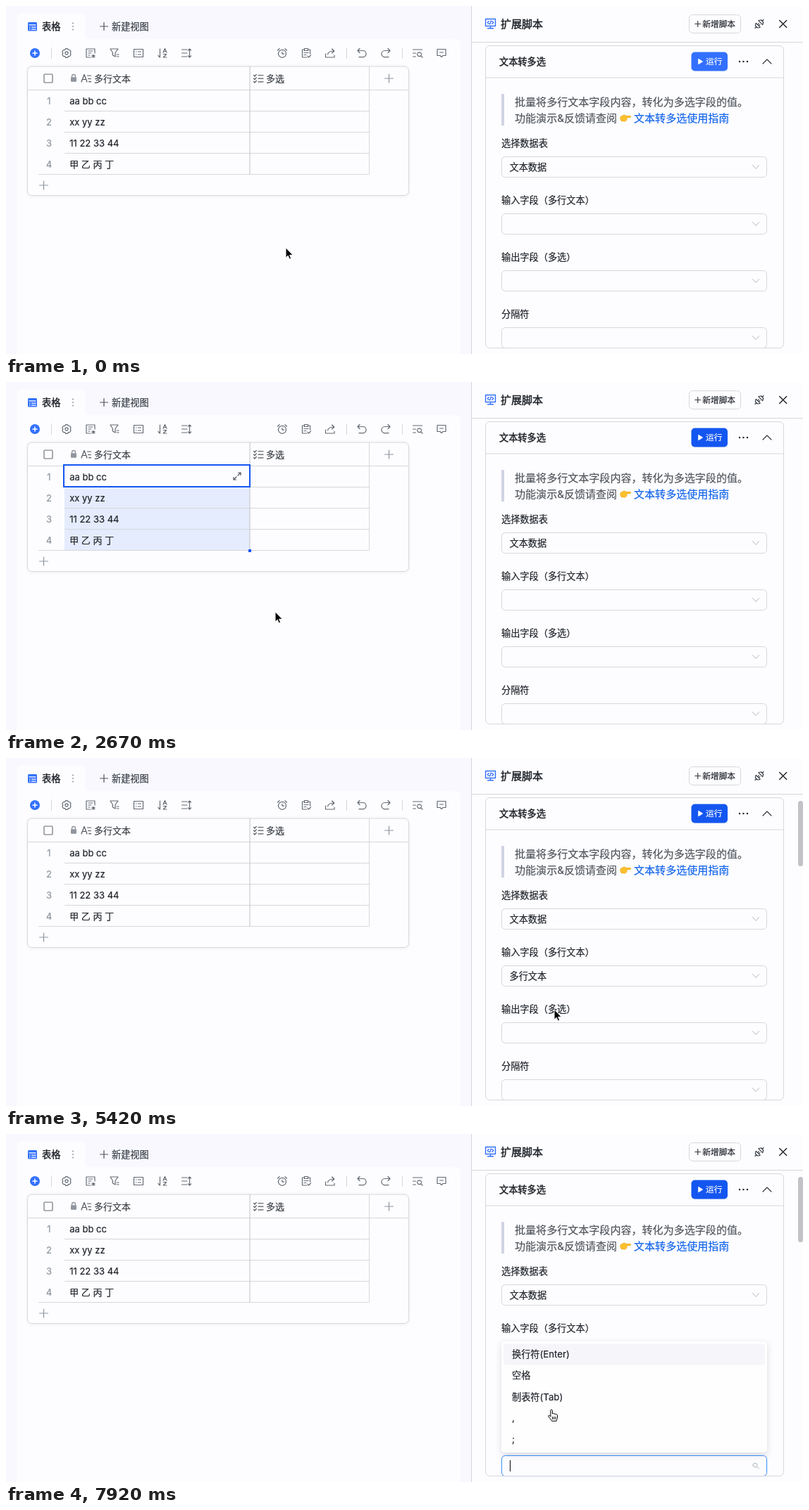
An HTML page that plays this animation: 1131 by 495 pixels, repeating every 8000 ms.

```html
<!DOCTYPE html>
<html lang="zh-CN">
<head>
<meta charset="utf-8">
<title>文本转多选</title>
<style>
html, body { margin: 0; width: 100%; height: 100%; overflow: hidden; background: #f8f8fe; }
svg { display: block; width: 1131px; height: 495px; }
text { font-family: Inter, "Noto Sans CJK SC", "Noto Sans CJK", sans-serif; white-space: pre; stroke-width: .2px; }
text[font-weight="500"] { stroke-width: .45px; }
.drop { filter: drop-shadow(0 3px 5px rgba(30, 35, 60, .16)); }
</style>
</head>
<body>
<svg id="stage" viewBox="0 0 1131 495" xmlns="http://www.w3.org/2000/svg"></svg>
<script>
const LOOP = 8000, TICK = 1000 / 12;
const INK = '#1f2329', GREY = '#646a73', LINE = '#d5d7dc', BLUE = '#3370ff', DEEP = '#1456f0', PAPER = '#fdfdff';
const FIELD_Y = [214.5, 295.5, 376.5, 457.5];

// Drawing helpers; text and icons are placed by their vertical centre.
const text = (x, cy, s, size = 13.2, fill = INK, extra = '') =>
  `<text x="${x}" y="${cy + size * .35}" font-size="${size}" fill="${fill}" stroke="${fill}" ${extra}>${s}</text>`;
const rect = (x, y, w, h, fill, extra = '') =>
  `<rect x="${x}" y="${y}" width="${w}" height="${h}" fill="${fill}" ${extra}/>`;
const line = (d, color = LINE, w = 1, fill = 'none') =>
  `<path d="${d}" fill="${fill}" stroke="${color}" stroke-width="${w}"/>`;
const icon = (x, y, d, color = GREY, w = 1.2, fill = 'none') =>
  `<path transform="translate(${x} ${y})" d="${d}" fill="${fill}" stroke="${color}" stroke-width="${w}" stroke-linecap="round" stroke-linejoin="round"/>`;
const plus = (x, y, r, color = GREY, w = 1.2) => icon(x, y, `M${-r} 0H${r}M0 ${-r}V${r}`, color, w);
const group = (id, body, extra = '') => `<g id="${id}" ${extra}>${body}</g>`;
const dot = (x, y, r, fill) => `<circle cx="${x}" cy="${y}" r="${r}" fill="${fill}"/>`;
const box = (x, y) => rect(x - 6, y - 6, 12, 12, PAPER, `rx="1" stroke="${GREY}" stroke-width="1.1"`);
const ring = r => `M${-r} 0a${r} ${r} 0 1 0 ${2 * r} 0a${r} ${r} 0 1 0 ${-2 * r} 0`;

function tabs() {
  return line('M15 495V19Q15 11 23 11H105Q113 11 113 19V41Q113 47 119 47H637Q645 47 645 55V495Z', 'none', 0, PAPER) +
    rect(31, 23, 13, 12.5, BLUE, 'rx="1.5"') +
    line('M32.5 26.9H42.5M36 30.2H42.5M36 33.2H42.5M33 30.2H34.5M33 33.2H34.5', PAPER, 1.2) +
    text(51, 29, '表格', 13.2, INK, 'font-weight="500"') +
    [24.5, 29, 33.5].map(y => dot(95, y, 1, '#8f959e')).join('') +
    plus(139, 29, 5.5, '#51565d') + text(150, 29, '新建视图', 13.2, '#373c43');
}

function toolbar() {
  const y = 67, page = 'M6 0V-6H-6V6H0M-3-3H3M-3 0H1M-3 3H-1';
  const tools = [
    [86, 'M-1.5-6.3H1.5L2.4-4.6L4.6-4.5L6.1-2L5.2 0L6.1 2L4.6 4.5L2.4 4.6L1.5 6.3H-1.5L-2.4 4.6L-4.6 4.5L-6.1 2L-5.2 0L-6.1-2L-4.6-4.5L-2.4-4.6Z' + ring(2.1)],
    [120, page + 'M4 2V6.5M2 3.2L6 5.4M6 3.2L2 5.4'],
    [154, 'M-6-6H5L1-.5V5L-2.5 3V-.5ZM3 2H6M3 5H6'],
    [188, 'M-6.5-5.5H6.5V5.5H-6.5ZM-3.5-2H-3M-.5-2H3.5M-3.5 2H-3M-.5 2H3.5'],
    [222, 'M-3.5-6V6L-6 3.5M1-.8L3.5-6.5L6-.8M2-2.5H5M1.3 1.5H5.7L1.3 6H5.7'],
    [256, 'M-6.5-5H1M-6.5 0H1M-6.5 5H1M4.5-6V6M2.5-4L4.5-6L6.5-4M2.5 4L4.5 6L6.5 4'],
    [392, 'M-5.5 .8a5.5 5.5 0 1 0 11 0a5.5 5.5 0 1 0-11 0M0-2V1.2H2.6M-6.5-4L-4-6.3M6.5-4L4-6.3'],
    [426, 'M-2.5-5H-5.5V6H1M2.5-5H5.5V1M-2.5-6.5H2.5V-3.5H-2.5ZM-3-.5H3M-3 2.5H0M2 4.2L3.7 6L6.5 2.8'],
    [460, 'M-6.5 1V6H6V3M-3.5 2C-3-2 0-3 5.5-3M2.5-6L5.8-3L2.5 0'],
    [505, 'M-3-6.5L-6-3.5L-3-.5M-6-3.5H1.5A4.6 4.6 0 0 1 1.5 5.7H-4'],
    [539, 'M3-6.5L6-3.5L3-.5M6-3.5H-1.5A4.6 4.6 0 0 0-1.5 5.7H4'],
    [584, 'M-6.5-5H6.5M-6.5 0H-2.5M-6.5 5H-2.5M-.3 1.7a2.9 2.9 0 1 0 5.8 0a2.9 2.9 0 1 0-5.8 0M4.6 3.8L6.8 6'],
    [618, 'M-6-5.5H6V3.5H2L0 5.7L-2 3.5H-6ZM-2.5-1H2.5']
  ];
  return dot(41, y, 7, BLUE) + plus(41, y, 3, '#fff', 1.5) +
    [64.5, 483.5, 562.5].map(x => line(`M${x} 59V75`)).join('') +
    tools.map(([x, d]) => icon(x, y, d)).join('');
}

function table() {
  const rows = ['aa bb cc', 'xx yy zz', '11 22 33 44', '甲 乙 丙 丁'];
  const cy = i => 135.2 + 30 * i;
  return rect(30.5, 86, 541, 183.5, PAPER, `rx="6" stroke="${LINE}" style="filter:drop-shadow(0 1px 2px rgba(30,35,60,.07))"`) +
    rect(83, 87, 263, 32, '#f3f4f8', 'id="headHover"') +
    rect(46, 119, 469, 30, '#f6f7fb', 'id="rowTint"') +
    rect(83, 119, 263, 30, '#e4ecfd', 'id="range"') +
    line('M31 119.5H571M83 149.5H515M83 179.5H515M83 209.5H515M46 239.5H515M515.5 86V239') +
    line('M346 86V239', '#bfc2c9') +
    box(60, 103) +
    icon(96, 103, 'M-2.5-1V-3A2.5 2.5 0 0 1 2.5-3V-1', '#8f959e', 1.3) + rect(92, 101.3, 8, 6.5, '#8f959e', 'rx="1"') +
    icon(113, 103, 'M-6 5L-2-5.5L2 5M-4.7 1.5H.7M2.5-4H7.5M3.5 .5H7.5M4.5 4.7H7.5', '#51565d') +
    text(125, 103, '多行文本', 13, '#373c43') +
    icon(358, 103, 'M-6.5-4.5L-5-3L-2.7-5.7M-6.5 0L-5 1.5L-2.7-1.2M-6.5 4.5L-5 6L-2.7 3.3M0-4.5H7M0 .2H7M0 4.8H7', '#51565d') +
    text(369, 103, '多选', 13, '#373c43') +
    plus(543.5, 103, 6, '#8f959e') + plus(53.5, 255, 6, '#8f959e') +
    group('active', rect(82, 118, 264, 31, PAPER, `stroke="${DEEP}" stroke-width="2"`) +
      icon(328, 134, 'M1.5-5H5V-1.5M5-5L1-1M-1.5 5H-5V1.5M-5 5L-1 1', '#51565d') +
      rect(344, -2, 4, 4, DEEP, 'id="handle"')) +
    rows.map((s, i) => text(90.2, cy(i), s, 13) +
      text(61, cy(i), i + 1, 13, '#8f959e', `id="num${i}" text-anchor="middle"`)).join('') +
    group('rowTools', box(60, 134.5) +
      [0, 1, 2, 3, 4, 5].map(k => dot(39 + k % 2 * 4.2, 130 + (k >> 1) * 4.5, 1.1, '#8f959e')).join(''));
}

function field(i, label, value = '') {
  const y = FIELD_Y[i], c = y + 14.5;
  return text(703, y - 18.8, label) +
    rect(703.5, y, 376, 29, PAPER, `id="field${i}" rx="5"`) +
    group('value' + i, text(714.5, c, value)) +
    group('arrow' + i, icon(1064, c, 'M-4.5-2.5L0 2.5L4.5-2.5', '#b3b7be', 1));
}

function panel() {
  return rect(660, 0, 471, 495, PAPER) + line('M660.5 0V495M661 51.5H1131') +
    icon(687.5, 25, 'M-7-6.5H7V3.5H-7ZM0 3.5V6.8M-4 6.8H4M-2.3-3.3L-4.3-1.5L-2.3 .3M2.3-3.3L4.3-1.5L2.3 .3M.7-3.8L-.7 .8', BLUE, 1.4) +
    text(702, 25.5, '扩展脚本', 15, INK, 'font-weight="500"') +
    rect(969.5, 12.5, 73, 26, PAPER, `rx="5" stroke="${LINE}"`) + plus(981.7, 25.5, 4, '#373c43') +
    text(988.3, 25.5, '新增脚本', 11.7) +
    icon(1069, 25.5, 'M-6 6L-3.7 3.7M6-6L3.7-3.7M-4.7-1.2L1.2 4.7L-.6 5.3Q-3 6-4.6 4.2T-5.3 .6ZM-1.2-4.7L4.7 1.2L5.3-.6Q6-3 4.2-4.6T.6-5.3ZM-2.4 1L-.7-.7M-.8 2.6L.9 .9', '#373c43') +
    icon(1102.7, 25.5, 'M-5-5L5 5M5-5L-5 5', INK, 1.4) +
    line('M681 102H1103') +
    text(700, 79, '文本转多选', 13.2, INK, 'font-weight="500"') +
    rect(972.5, 65.5, 51.5, 27, BLUE, 'id="run" rx="5"') + icon(985.5, 79, 'M-2.5-3.5L3 0L-2.5 3.5Z', '#fff', 1, '#fff') +
    text(993, 79, '运行', 11.7, '#fff') +
    [1041, 1046.5, 1052].map(x => dot(x, 79, 1.2, INK)).join('') +
    icon(1080, 79, 'M-6 3L0-3L6 3', '#373c43', 1.3) +
    rect(703, 125, 4, 45, '#cfd5e4') +
    text(722, 137, '批量将多行文本字段内容，转化为多选字段的值。', 15.05, '#51565d') +
    text(722, 159.5, '功能演示&amp;反馈请查阅', 15.05, '#51565d') +
    icon(871, 154.5, 'M1 3.2L5 .8Q8-.4 8.5 1.8H15Q16.7 3 15 4.2H9.5Q11.5 4.9 9.8 6.2Q10.7 7.3 9 8Q9.3 9.5 7 9.5H4Q1 9.2 1 6.8Z', '#eda71b', .7, '#fbc02d') +
    text(891, 159.5, '文本转多选使用指南', 15.05, '#1264ea') +
    field(0, '选择数据表', '文本数据') + field(1, '输入字段（多行文本）', '多行文本') +
    field(2, '输出字段（多选）', '多选') + field(3, '分隔符') +
    rect(680.5, 56.5, 423, 430, 'none', `rx="6" stroke="${LINE}"`) +
    group('search', line('M715.5 464V480', INK, 1.2) +
      icon(1063, 471, ring(3) + 'M2.3 2.3L5.5 5', '#b3b7be', 1)) +
    rect(1124, 61, 7, 93, '#c3c3c7', 'id="scroll" rx="3.5"');
}

function drop(i, y, options) {
  const h = options.length * 30.2 + 7;
  return group('drop' + i, rect(703, y, 377, h, '#fefeff', 'rx="5"') +
    rect(706, y + 3.5, 371, 30, '#f6f6fa', `id="pick${i}" rx="4"`) +
    options.map((s, k) => text(718, y + 18.5 + k * 30.2, s, 13.2, INK, k ? '' : `id="option${i}"`)).join(''), 'class="drop"');
}

const pointers =
  group('arrow', icon(0, 0, 'M0 0V14.2L3.2 11.2L5.3 16L7.6 15L5.6 10.3H9.9Z', '#fff', 1, '#000')) +
  group('hand', icon(-4.5, 0, 'M3.2 1.2C3.2-.3 5.8-.3 5.8 1.2V6C6.4 5 8.2 5.2 8.3 6.4C9 5.6 10.6 5.9 10.7 7C11.5 6.4 13 6.8 13 8.2V11C13 13 12 14 11.5 16.3H5C4.5 14.5 1.5 12 .3 9.5C-.3 8.2 1.4 7.6 2.2 8.6L3.2 9.8ZM6 10.5V13.5M8.2 10.5V13.5M10.4 10.5V13.5', '#000', 1, '#fff'));

document.getElementById('stage').innerHTML = tabs() + toolbar() + table() + panel() +
  drop(1, 329, ['多行文本']) + drop(2, 410, ['多选']) +
  drop(3, 295, ['换行符(Enter)', '空格', '制表符(Tab)', ',', ';']) + group('pointer', pointers);

const $ = id => document.getElementById(id);
const show = (id, on) => $(id).setAttribute('visibility', on ? 'visible' : 'hidden');
const set = (id, attrs) => { for (const k in attrs) $(id).setAttribute(k, attrs[k]); };
const clamp = v => Math.max(0, Math.min(1, v));

// Pointer stops: time, x, y of the tip.
const PATH = [
  [0, 397, 344], [150, 397, 344], [160, 336, 322], [583, 336, 322], [917, 192, 110], [1000, 192, 110],
  [1250, 190, 140], [1500, 190, 140], [1750, 194, 198], [2000, 197, 230], [2250, 197, 230], [2660, 382, 327],
  [2917, 382, 327], [3583, 786, 308], [4000, 786, 308], [4250, 782, 305], [4667, 782, 305], [5000, 778, 358],
  [5420, 778, 358], [5750, 771, 388], [6100, 771, 388], [6500, 733, 441], [6920, 733, 441], [7417, 775, 467],
  [7840, 775, 467], [7900, 774, 392]
];
const MENUS = [
  { i: 1, open: 4280, close: 5250, top: 329, bottom: 366, origin: 329 },
  { i: 2, open: 5950, close: 6750, top: 410, bottom: 447, origin: 410 },
  { i: 3, open: 7500, close: 9000, top: 295, bottom: 453, origin: 453 }
];

function pointerAt(t) {
  const n = PATH.findIndex(k => k[0] > t);
  if (n < 0) return PATH[PATH.length - 1].slice(1);
  const [t0, x0, y0] = PATH[n - 1], [t1, x1, y1] = PATH[n];
  const p = (t - t0) / (t1 - t0), e = p * p * (3 - 2 * p);
  return [x0 + (x1 - x0) * e, y0 + (y1 - y0) * e];
}

function drawTable(t, x, y) {
  const selected = t >= 1415 && t < 2745, dragging = t >= 1415 && t < 2160;
  const inTable = x > 31 && x < 571;
  const under = inTable && y >= 119 && y < 239 ? Math.floor((y - 119) / 30) : -1;
  const hover = dragging ? 0 : under;
  const last = dragging ? Math.max(0, under) : 3;
  show('headHover', inTable && y > 86 && y < 119 && x < 346);
  show('rowTint', hover >= 0 && !dragging);
  show('rowTools', hover >= 0);
  for (let i = 0; i < 4; i++) show('num' + i, i !== hover);
  if (hover >= 0) {
    set('rowTint', { y: 119 + hover * 30 });
    set('rowTools', { transform: `translate(0 ${hover * 30})` });
  }
  show('range', selected);
  show('active', selected);
  set('range', { height: 30 * (last + 1) });
  set('handle', { y: 148 + 30 * last });
}

function drawForm(t, x, y) {
  const lastOpen = t >= MENUS[2].open;
  let hand = false;
  for (const { i, open, close, top, bottom, origin } of MENUS) {
    const p = clamp((t - open) / (i === 3 ? 160 : 200)), out = clamp((t - close) / 160);
    const alive = p > 0 && out < 1, chosen = t >= close;
    const scale = chosen ? 1 - .2 * out : .8 + .2 * p * (2 - p);
    show('drop' + i, alive);
    set('drop' + i, { opacity: p * (1 - out), transform: `translate(0 ${origin * (1 - scale)}) scale(1 ${scale})` });
    set('pick' + i, { fill: chosen ? '#eaf3fd' : '#f6f6fa' });
    set('option' + i, { 'font-weight': chosen ? 600 : 400 });
    const inside = x > 703 && x < 1080;
    const over = inside && y > FIELD_Y[i] && y < FIELD_Y[i] + 29;
    hand = hand || over || (inside && alive && !chosen && y > top && y < bottom);
    set('field' + i, { stroke: alive || (over && !lastOpen) ? '#4596f7' : LINE });
    $('field' + i).style.filter = alive ? 'drop-shadow(0 0 1px rgba(51,130,255,.25))' : '';
    show('value' + i, chosen);
  }
  show('arrow3', !lastOpen);
  show('search', lastOpen);
  show('scroll', t >= 3245);
  set('run', { fill: t < 330 ? BLUE : t < 495 ? '#2463f8' : DEEP });
  show('hand', hand);
  show('arrow', !hand);
}

function draw(ms) {
  const t = Math.floor((ms % LOOP + 5) / TICK) * TICK % LOOP;
  const [x, y] = pointerAt(t);
  drawTable(t, x, y);
  drawForm(t, x, y);
  set('pointer', { transform: `translate(${x} ${y})` });
}

set('field0', { stroke: LINE });
const start = performance.now();
function frame() {
  draw(performance.now() - start);
  requestAnimationFrame(frame);
}
frame();
</script>
</body>
</html>
```
